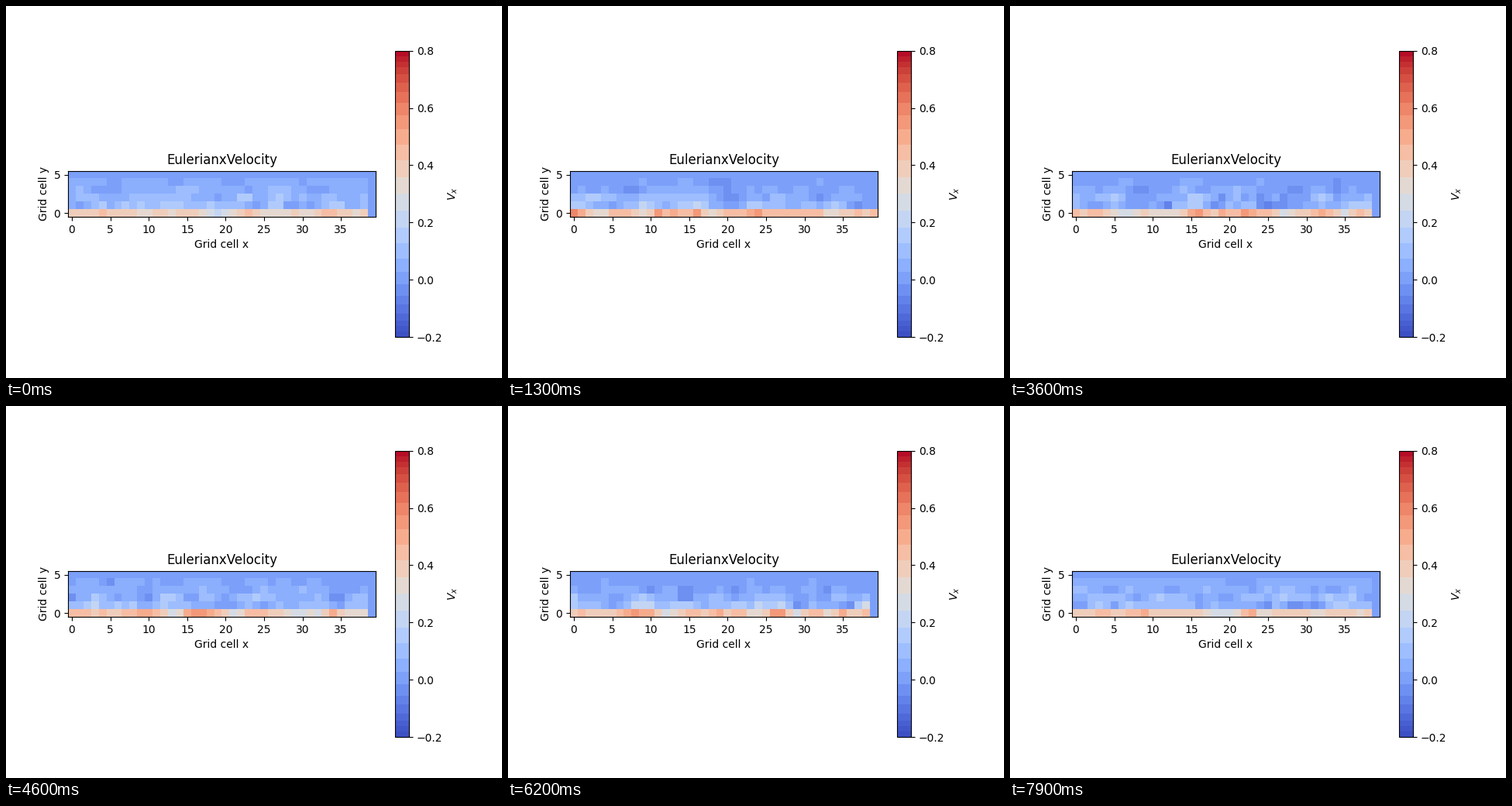
Write a matplotlib script that moves like this. It is 640 by 480 pixels and loops after 8000 ms.

```python
import numpy as np
import matplotlib.pyplot as plt
from matplotlib.animation import FuncAnimation
from matplotlib.colors import ListedColormap

FRAMES, ROWS, COLS = 80, 6, 40
VMIN, VMAX = -0.2, 0.8
BANDS = 26


def banded_cmap():
    """Coolwarm in flat bands, wide in the middle and narrow at the ends."""
    def warp(u):
        return u - 0.55 * np.sin(2 * np.pi * u) / (2 * np.pi)

    edges = warp(np.arange(1, BANDS) / BANDS)
    mids = warp((np.arange(BANDS) + 0.5) / BANDS)
    colors = plt.get_cmap("coolwarm")(mids)
    return ListedColormap(colors[np.digitize(np.linspace(0, 1, 256), edges)])


def blend(a, axis, side):
    """Mix each entry with its neighbours along an axis."""
    return a + side * (np.roll(a, 1, axis) + np.roll(a, -1, axis))


def unit_noise():
    noise = np.random.default_rng(7).normal(size=(FRAMES, ROWS, COLS))
    noise = blend(noise, axis=0, side=0.5)
    noise = blend(noise, axis=1, side=0.15)
    noise = blend(noise, axis=2, side=0.35)
    return noise / noise.std()


NOISE = unit_noise()


def velocity(step):
    # The flow is fast on the floor and dies out towards the resting top.
    height = np.arange(ROWS)[:, None]
    mean = 0.022 * (5 - height)
    spread = 0.014 * (5 - height)
    mean[0] = 0.42
    mean[1:-1] += 0.015 * np.cos(2 * np.pi * step / 26)
    field = mean + spread * NOISE[step]

    # The exit column is empty, except for a floor cell now and then.
    floor_exit = field[0, -1] if step % 20 == 13 else 0
    field[:, -1] = 0
    field[0, -1] = floor_exit
    return field


fig, ax = plt.subplots(figsize=(6.4, 4.8), dpi=100)
image = ax.imshow(velocity(0), origin="lower", cmap=banded_cmap(),
                  vmin=VMIN, vmax=VMAX, interpolation="nearest")
ax.set_title("EulerianxVelocity")
ax.set_xlabel("Grid cell x")
ax.set_ylabel("Grid cell y")
ax.set_xticks(range(0, COLS, 5))
ax.set_yticks([0, 5])
fig.colorbar(image, ax=ax, label="$V_x$", ticks=np.arange(-0.2, 0.9, 0.2))


def update(step):
    image.set_data(velocity(step))
    return [image]


anim = FuncAnimation(fig, update, frames=FRAMES, interval=100,
                     repeat=True, repeat_delay=0)
plt.show()
```
